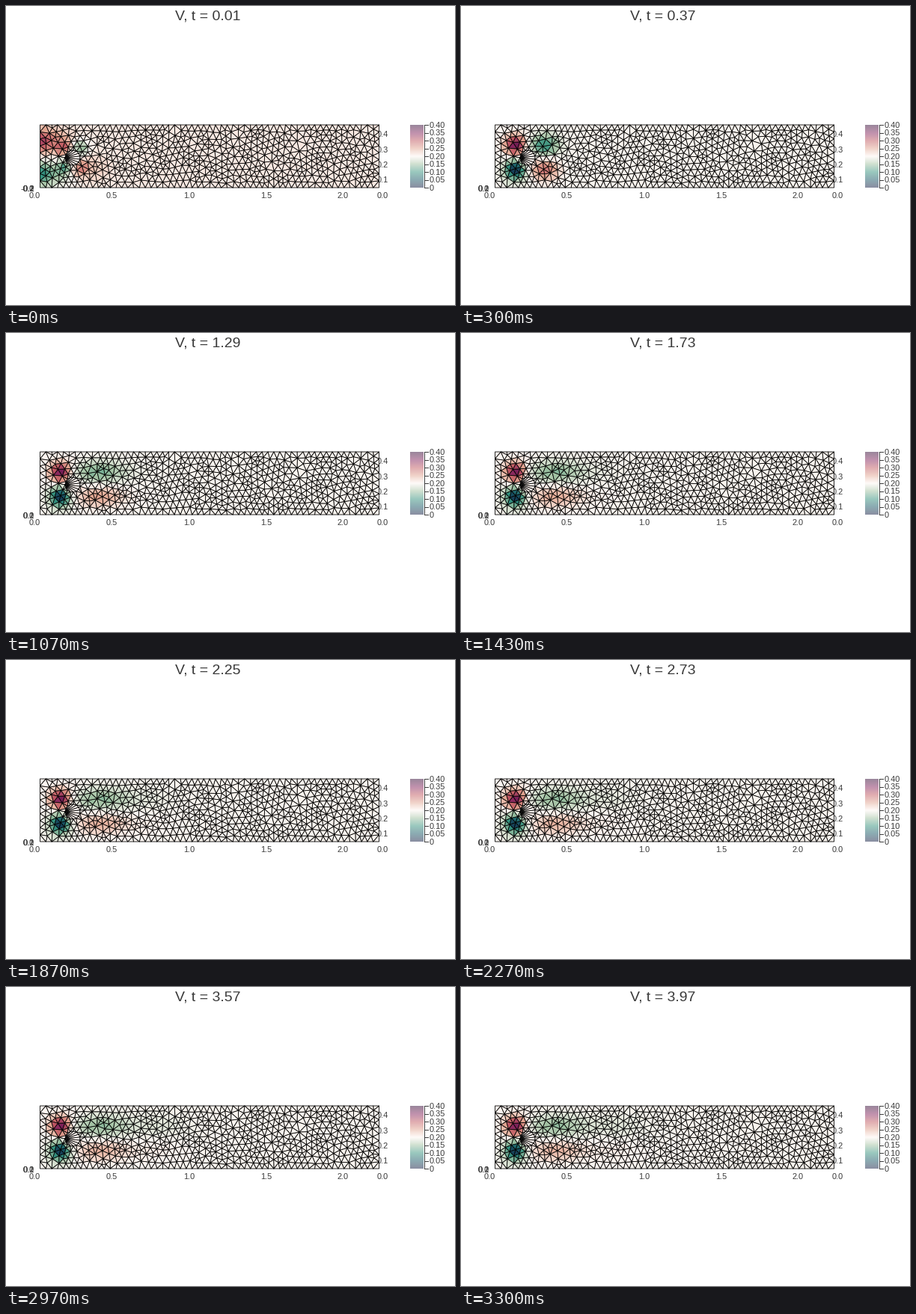
These frames come from a looping animation (600 px wide and 400 px high, 3330 ms). A matplotlib script:

```python
import numpy as np
import matplotlib.pyplot as plt
from matplotlib.animation import FuncAnimation
from matplotlib.collections import PolyCollection
from matplotlib.colors import LinearSegmentedColormap
from matplotlib.tri import Triangulation

W, H, DPI = 600, 400, 100
LOOP, TICK, STEP_MS = 3330, 30, 100 / 3
LEFT, RIGHT, TOP, BOTTOM = 45.5, 498.5, 159.0, 243.0
CYL, RADIUS, RIM = np.array([89.0, 203.0]), 10.0, 15
INK = "#3a3a3a"

cmap = LinearSegmentedColormap.from_list("curl", [
    "#141d43", "#185866", "#34927e", "#a2c2a3", "#fef6f2",
    "#e2a792", "#c15962", "#83235d", "#330d35"])


def rim_distance(p):
    return np.hypot(*(p - CYL).T) - RADIUS


def boundary():
    """Channel walls followed by the cylinder rim, starting at its left end."""
    xs = np.linspace(LEFT, RIGHT, 59)
    ys = np.linspace(TOP, BOTTOM, 10)[1:-1]
    walls = [(x, y) for y in (TOP, BOTTOM) for x in xs]
    walls += [(x, y) for x in (LEFT, RIGHT) for y in ys]
    a = np.pi + 2 * np.pi * np.arange(RIM) / RIM
    rim = CYL + RADIUS * np.column_stack([np.cos(a), np.sin(a)])
    return np.vstack([walls, rim])


def build_mesh():
    rng = np.random.default_rng(4)
    pts = boundary()
    n = len(pts)
    low, high = (LEFT + 4, TOP + 4.5), (RIGHT - 4, BOTTOM - 4.5)
    for p in rng.uniform(low, high, (10000, 2)):
        d = rim_distance(p[None])[0]
        gap = min(6.3, 4.2 + 0.3 * d)
        if d > 3 and np.hypot(*(pts - p).T).min() > gap:
            pts = np.vstack([pts, p])

    # Even out the spacing by pulling points to the mean of their neighbours
    for _ in range(5):
        edges = Triangulation(*pts.T).edges
        total, count = np.zeros_like(pts), np.zeros(len(pts))
        for a, b in (edges.T, edges.T[::-1]):
            np.add.at(total, a, pts[b])
            np.add.at(count, a, 1)
        mean = total / np.maximum(count, 1)[:, None]
        pts[n:] += 0.7 * (mean[n:] - pts[n:])

    tris = Triangulation(*pts.T).triangles
    hub = n - RIM
    inside = ((tris >= hub) & (tris < n)).all(axis=1)
    fan = [(hub, hub + i, hub + i + 1) for i in range(1, RIM - 1)]
    return pts, np.vstack([tris[~inside], fan])


pts, tris = build_mesh()
near_rim = 1 - np.exp(-(np.maximum(rim_distance(pts), 0) / 4) ** 2)


def blob(x, y, sx, sy):
    return np.exp(-((pts[:, 0] - x) / sx) ** 2 / 2
                  - ((pts[:, 1] - y) / sy) ** 2 / 2)


def pair(amp, x, dy, sx, sy, below=1.0):
    """Opposite blobs above and below the channel's axis."""
    mid = CYL[1] - 0.5
    return amp * (blob(x, mid - dy, sx, sy)
                  - below * blob(x, mid + dy, sx, sy))


inlet = pair(0.55, 45, 22, 9, 10) + pair(0.32, 66, 22, 13, 10)
rim_flow = pair(0.7, 79, 11, 5, 5) - pair(0.6, 98, 11, 6, 6)
START = 0.04 + inlet + rim_flow + 0.12 * blob(114, 217, 16, 11)
FRONT = pair(0.95, 72.5, 15.5, 7, 7) + pair(0.22, 73, 19, 12, 10)


def wake(t):
    grow = 1 - np.exp(-t / 0.6)
    drift = 1 - np.exp(-t / 1.5)
    near = pair(0.82 - 0.52 * grow, 98 + 29 * grow, 16.5,
                6 + 20 * grow ** 1.5, 8.5, 0.85)
    far = pair(0.1 * drift ** 3, 100 + 115 * drift, 16, 27, 11, 0.6)
    return -near - far


def field(t):
    start = np.exp(-(t - 0.01) / 0.05)
    v = start * START + (1 - start) * (FRONT + wake(t) - 0.015)
    return (near_rim * v)[tris].mean(axis=1)


fig = plt.figure(figsize=(W / DPI, H / DPI), dpi=DPI, facecolor="white")
ax = fig.add_axes([0, 0, 1, 1])


def label(x, y, s, ha="center", px=11):
    return ax.text(x, y, s, ha=ha, va="baseline", color=INK, zorder=1,
                   family="Liberation Sans", fontsize=px * 72 / DPI)


title = label(270, 18.5, "", px=19.5)
for i in range(5):
    label(38.5 + 103 * i, 257, f"{i / 2:.1f}")
    label(503.5, 257 - 20.5 * i, f"{i / 10:.1f}")
for i in range(3):
    label(38, 248, f"{i / 10:.1f}", "right")
minus = label(38, 248, "-0.2", "right")

# Colour bar
ax.imshow(np.linspace(0, 1, 256)[:, None], cmap=cmap, alpha=0.5,
          extent=(540, 558, BOTTOM, TOP), origin="lower", aspect="auto")
ax.plot([558.5, 558.5], [TOP, BOTTOM], color=INK, lw=0.7)
for i in range(9):
    y = BOTTOM - (BOTTOM - TOP) * i / 8
    ax.plot([558.5, 564], [y, y], color=INK, lw=0.7)
    label(566, y + 3.7, f"{i / 20:.2f}" if i else "0", "left")

mesh = PolyCollection(pts[tris], cmap=cmap, edgecolors="black",
                      linewidths=0.6, zorder=3)
mesh.set_clim(-1, 1)
ax.add_collection(mesh)
ax.set_xlim(0, W)
ax.set_ylim(H, 0)
ax.axis("off")


def update(tick):
    # The newest solver step reached by the end of this tick
    step = int((tick * TICK + 25) / STEP_MS)
    t = 0.01 + 0.04 * step
    title.set_text(f"V, t = {t:.2f}")
    minus.set_visible(step == 0)
    mesh.set_array(field(t))
    return title, minus, mesh


anim = FuncAnimation(fig, update, frames=LOOP // TICK, interval=TICK,
                     repeat=True, repeat_delay=0, blit=False)
plt.show()
```
